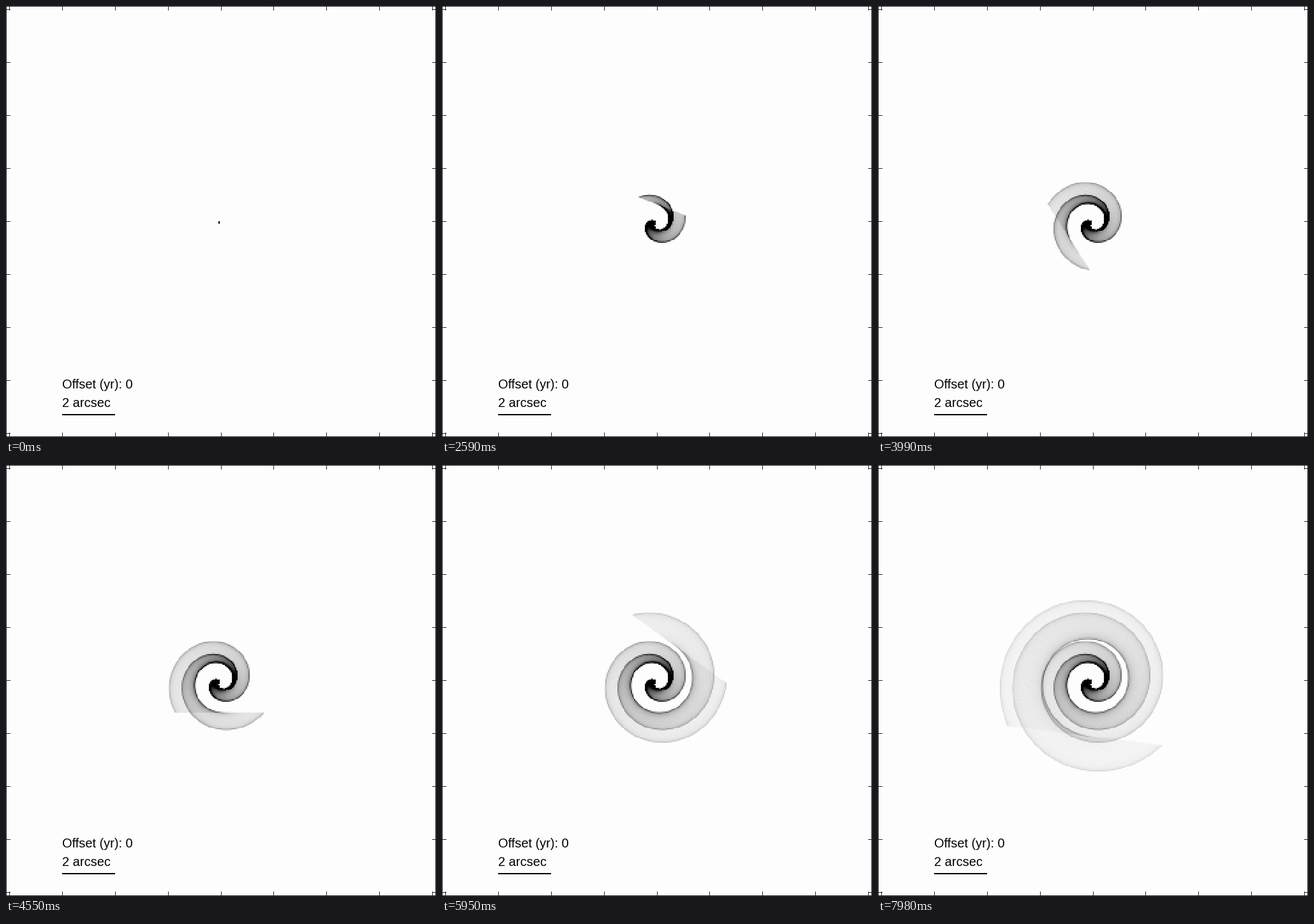
Recreate the animation shown at these times as a matplotlib script. Size 674 by 675 pixels, loop 8000 ms.

```python
import numpy as np
import matplotlib.pyplot as plt
from matplotlib.animation import FuncAnimation

W, H, DPI = 674, 675, 64
LOOP, TICK, STEP = 8000, 20, 70      # ms: loop, drawing interval, growth step
STEPS = LOOP // STEP + 1
GRID = 360
PAPER, INK = 253, 38

# Face-on conical outflow: each ring is seen edge-on as a straight bar
CX, CY = 335.0, 339.5
DRIFT, SPREAD = 0.745, 1.068         # px per step: along the axis, half width
START, TURN = np.radians(198), np.radians(-7.2)
RINGS, POINTS = 20, 400
MASS, GAMMA = 60.0, 0.88


def ring_bins(k):
    """Density added to the grid while the plume grows from step k-1 to k."""
    t = k - 1 + np.arange(1, RINGS + 1)[:, None] / RINGS
    phi = 2 * np.pi * np.arange(POINTS)[None, :] / POINTS
    a = START + TURN * t
    along, across = DRIFT * t, SPREAD * t * np.cos(phi)
    x = CX + along * np.cos(a) + across * np.sin(a)
    y = CY + along * np.sin(a) - across * np.cos(a)
    hist = np.histogram2d(y.ravel(), x.ravel(), bins=GRID,
                          range=[[0, H], [0, W]])[0]
    return hist * MASS / (RINGS * POINTS) * GRID * GRID / (W * H)


def shade(density):
    dark = np.clip(density, 0, 1) ** GAMMA
    return np.round(PAPER * (1 - dark)).astype(np.uint8)


def draw_frame(img):
    """Border, inward ticks and the scale bar."""
    img[[0, -1], :] = INK
    img[:, [0, -1]] = INK
    xs = np.round(5 + 82.88 * np.arange(9)).astype(int)
    ys = 5 + 83 * np.arange(9)
    for edge in (slice(0, 7), slice(-7, None)):
        img[edge, xs] = INK
    for edge in (slice(0, 7), slice(-6, None)):
        img[ys, edge] = INK
    img[639:641, 88:171] = 0


density = np.zeros((GRID, GRID))
plumes = []
for k in range(1, STEPS):
    density = density + ring_bins(k)
    plumes.append(shade(density))

rows = ((np.arange(H) + 0.5) * GRID / H).astype(int)
cols = ((np.arange(W) + 0.5) * GRID / W).astype(int)


def stage(k):
    img = plumes[max(k, 1) - 1][rows][:, cols]
    draw_frame(img)
    return np.repeat(img[:, :, None], 3, axis=2)


fig = plt.figure(figsize=(W / DPI, H / DPI), dpi=DPI, facecolor="white")
picture = fig.figimage(stage(0), origin="upper")


def label(x, baseline, text):
    fig.text(x / W, 1 - baseline / H, text, family="Liberation Sans",
             size=20 * 72 / DPI, color="black", ha="left", va="baseline")


label(88, 599, "Offset (yr): 0")
label(88, 628, "2 arcsec")


def update(i):
    picture.set_data(stage((i * TICK + TICK // 2) // STEP))
    return [picture]


anim = FuncAnimation(fig, update, frames=LOOP // TICK, interval=TICK,
                     init_func=lambda: update(0), repeat=True, repeat_delay=0)
plt.show()
```
